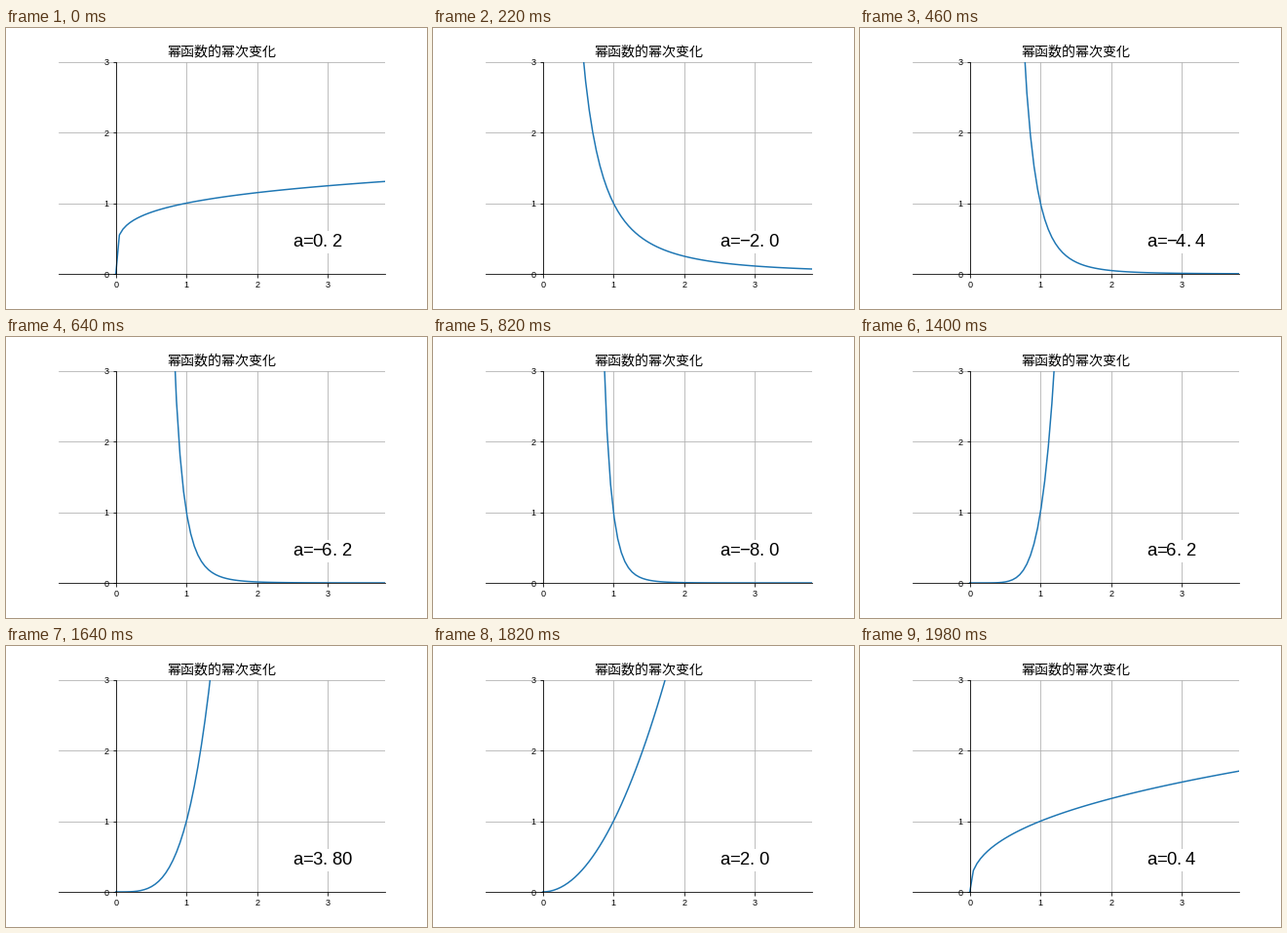
Write a matplotlib script that moves like this. It is 432x288 px and loops after 2 s.

```python
import numpy as np
import matplotlib.pyplot as plt
from matplotlib.animation import FuncAnimation
from matplotlib.patches import Rectangle

W, H, DPI = 432, 288, 72
FRAMES, INTERVAL = 100, 20
STEP = 0.2
CELL = 10                      # half-width character cell of the label, px
LABEL_X, LABEL_Y = 294, 64.5   # label origin, px from bottom left

plt.rcParams["font.family"] = "Liberation Sans"

fig = plt.figure(figsize=(W / DPI, H / DPI), dpi=DPI, facecolor="white")
ax = fig.add_axes([0.125, 0.125, 0.775, 0.755])

# Equal units on both axes, centred on the square 0..3
half = 1.5 * (0.775 * W) / (0.755 * H)
ax.set_xlim(1.5 - half, 1.5 + half)
ax.set_ylim(0, 3)
ax.set_xticks(range(4))
ax.set_yticks(range(4))
ax.tick_params(labelsize=9)
ax.grid(color="#b0b0b0", linewidth=0.8)
for side in ("top", "right"):
    ax.spines[side].set_visible(False)
for side in ("left", "bottom"):
    ax.spines[side].set_position(("data", 0))
ax.set_title("幂函数的幂次变化", fontsize=14, family="Noto Sans CJK JP")

x = np.linspace(0, 5, 100)
curve, = ax.plot([], [], color="#1f77b4", linewidth=1.5)

box = ax.add_patch(Rectangle((LABEL_X - 4, 57), 0, 23, transform=None,
                             facecolor="white", edgecolor="none", zorder=3))
cells = [ax.text(LABEL_X + CELL * i, LABEL_Y, "", transform=None,
                 fontsize=18.5, zorder=4) for i in range(6)]


def exponent(frame):
    """Falls by STEP each frame and wraps from -9.8 to 10."""
    return ((50 - frame) % FRAMES - 49) * STEP


def update(frame):
    a = exponent(frame)
    with np.errstate(divide="ignore"):
        curve.set_data(x, x ** a)
    label = "a=" + str(a)[:4].replace("-", "\u2212")
    box.set_width(len(label) * CELL + 8)
    for cell, char in zip(cells, label.ljust(len(cells))):
        cell.set_text(char.strip())
    return [curve, box, *cells]


anim = FuncAnimation(fig, update, frames=FRAMES, interval=INTERVAL,
                     init_func=lambda: update(0), repeat=True,
                     repeat_delay=0, blit=False)
plt.show()
```
